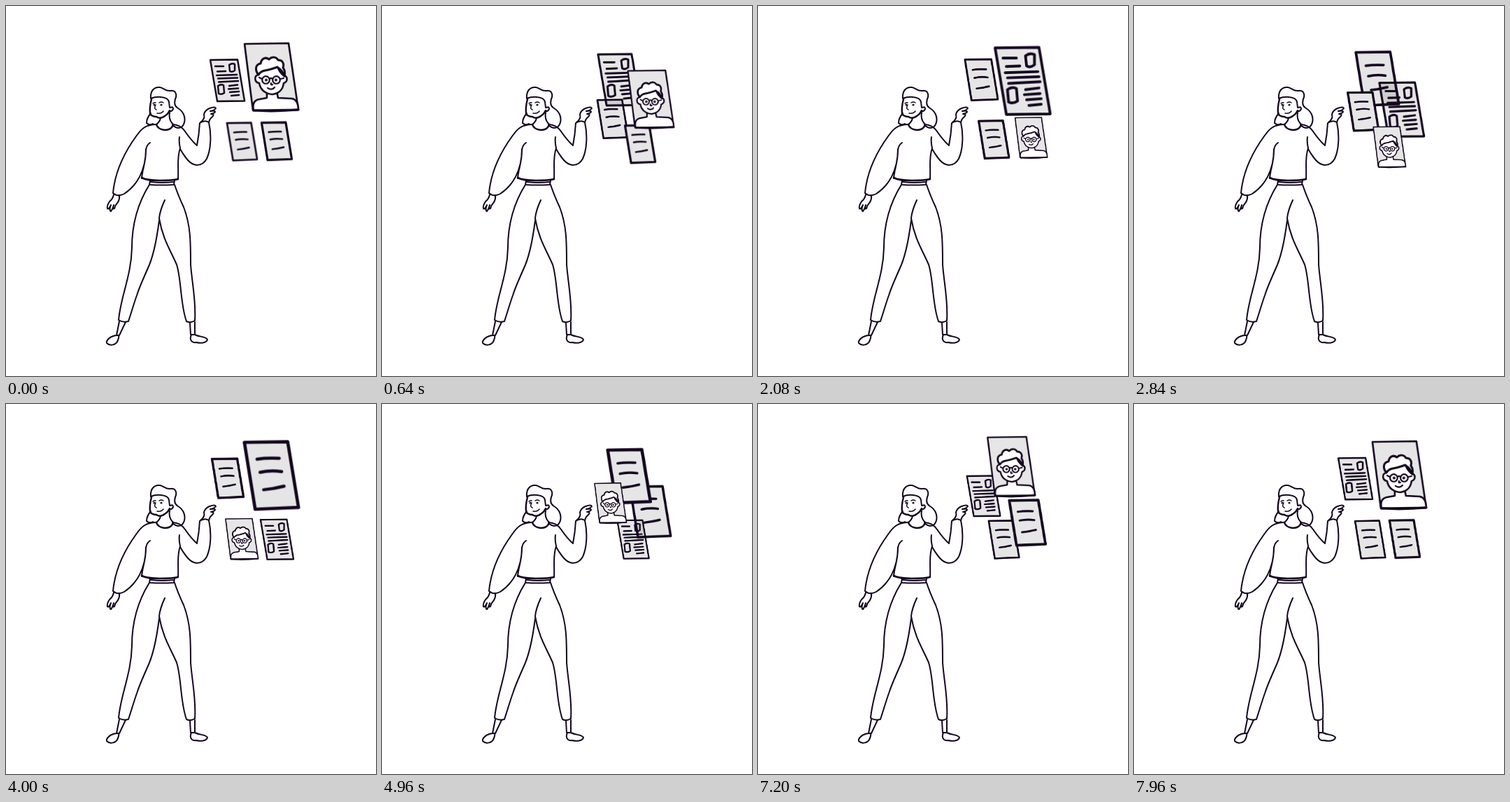
These frames come from a looping animation (529x528 px, 8 s). An HTML page:

```html
<!DOCTYPE html>
<html lang="en">
<head>
<meta charset="utf-8">
<title>Moving cards</title>
<style>
html, body { margin: 0; width: 100%; height: 100%; overflow: hidden; background: #fff; }
svg { display: block; width: 529px; height: 528px; }
svg { fill: none; stroke: #14061f; stroke-linecap: round; stroke-linejoin: round; }
.white { fill: #fff; }
.sheet { fill: #e6e6e6; }
.clear { fill: rgba(0, 0, 0, .1); }
.dark { fill: #14061f; }
.person { stroke-width: 2; }

.card { animation: 8s cubic-bezier(.33, .3, .67, .95) infinite; }
#resume { animation-name: resume; }
#first { animation-name: first; }
#second { animation-name: second, dip; }
#portrait { animation-name: portrait, swing; }
#second, #portrait { animation-timing-function: cubic-bezier(.33, .3, .67, .95), ease-in-out; }

/* Each card visits the four places clockwise, two seconds apart. */
@keyframes resume {
  0%, 100% { transform: translate(316.5px, 106px) scale(1.04); }
  25% { transform: translate(378px, 103px) scale(1.7); }
  50% { transform: translate(387.5px, 193px) scale(1); }
  75% { transform: translate(337.5px, 193px) scale(.93); }
}
@keyframes portrait {
  0%, 100% { transform: translate(380px, 102px) scale(1.72); }
  25% { transform: translate(393px, 188px) scale(1.03); }
  50% { transform: translate(337.5px, 193px) scale(1.04); }
  75% { transform: translate(319px, 103px) scale(1); }
}
@keyframes first {
  0%, 100% { transform: translate(337.5px, 193.5px) scale(.96); }
  25% { transform: translate(317px, 105.5px) scale(1.02); }
  50% { transform: translate(379.5px, 102px) scale(1.72); }
  75% { transform: translate(386.5px, 193px) scale(.98); }
}
@keyframes second {
  0%, 100% { transform: translate(387px, 193px) scale(.96); }
  25% { transform: translate(338px, 194px) scale(.96); }
  50% { transform: translate(317px, 106px) scale(1); }
  75% { transform: translate(380.5px, 101px) scale(1.63); }
}
@keyframes dip {
  0%, 25%, 75%, 100% { translate: 0 0; }
  14% { translate: 0 6px; }
  88% { translate: 0 3px; }
}
@keyframes swing {
  0%, 25%, 50%, 75%, 100% { translate: 0 0; }
  38% { translate: 0 12px; }
  82% { translate: 0 -21px; }
}
</style>
</head>
<body>
<svg viewBox="0 0 529 528">
  <defs>
    <path id="page" d="M-22.5-27.5 13.5-28 22.5 26.5-13.5 28Z"/>
    <path id="lines" stroke-width="2.6" d="M-12-13.6Q-4-14.8 6.5-14.3M-9.5-2.7Q-1-4.5 8.5-3.3M-6.5 11.8Q2 11 10.5 8.8"/>
  </defs>

  <g class="person">
    <!-- hair and head -->
    <path d="M207 132C206 121 212 115 220 116C226 117 228 122 235 121C242 120 244 125 243 130C240 137 241 143 246 146C253 150 257 158 255 166C253 174 246 177 238 170"/>
    <path d="M207 132Q214 129 222 130Q232 131 233 137L234 145"/>
    <path stroke-width="2.4" d="M208 133Q205 144 206 154Q209 158 215 158Q221 162 227 157Q232 154 234 149"/>
    <path d="M235 145Q239 143 239 147Q237 151 234 150M207 153Q201 160 201 167Q205 171 210 168M221 160Q220 165 215 169M234 152Q232 161 238 168"/>
    <path stroke-width="1.5" d="M210 139Q212 137 214 138M219 138Q222 136 225 138M214 141Q211 147 215 148M216 153Q222 154 225 150"/>
    <circle class="dark" cx="212" cy="141" r=".6"/>
    <circle class="dark" cx="222" cy="141" r=".6"/>
    <path stroke-width="2.6" d="M215 169Q217 176 227 177Q237 177 239 169"/>
    <!-- jumper -->
    <path d="M215 169C199 169 193 176 186 186C170 208 156 234 153 267Q160 273 169 268C186 257 200 236 200 204M206 195Q201 198 200 206C200 224 195 232 194 246"/>
    <path stroke-width="2.6" d="M194 245Q201 249 220 249T246 247"/>
    <path d="M246 247C247 230 244 217 249 203Q247 194 248 187M239 169Q250 170 256 179Q265 192 273 199Q276 184 277 167Q284 162 290 166C294 184 293 205 287 218C280 230 268 229 260 220Q254 213 249 204"/>
    <!-- hands -->
    <path d="M278 166Q285 161 283 155Q284 149 291 146Q299 143 300 146Q298 149 292 150Q299 149 299 151Q298 153 293 154Q299 154 295 158Q291 161 290 166"/>
    <path d="M154 269Q153 275 148 279Q144 285 145 289Q147 291 150 284Q147 292 150 293Q152 291 154 284Q152 291 155 289Q156 284 160 280Q163 275 162 270"/>
    <!-- trousers -->
    <path d="M206 249L205 255Q223 256 240 255L241 249M207 251Q223 253 240 251"/>
    <path d="M205 255C190 279 180 309 180 345C179 386 164 414 161 448Q167 452 175 450C180 435 183 424 187 413C191 400 197 388 202 376C208 364 214 345 219 306M227 277Q220 292 219 303C224 333 236 350 244 369C251 391 249 425 258 450Q264 453 270 449C272 421 266 396 264 369C264 336 264 313 254 287Q246 270 241 255"/>
    <!-- feet -->
    <path d="M162 450L158 470M171 451L162 470M158 470C149 471 143 477 144 481C149 486 157 483 159 479Q162 473 161 470Z"/>
    <path d="M263 452L264 469M270 451L270 468M265 469C262 476 265 481 272 480C280 482 287 480 288 476C285 471 278 473 270 469Z"/>
  </g>

  <g id="resume" class="card">
    <g transform="scale(.962) translate(-316.5 -106)" stroke-width="2.4">
      <path class="sheet" d="M292 77 331 76.5 341 135.5 302 136Z"/>
      <path d="M299 86H311M302 93.5 314 93M301 99 330 98M303 103.5 331 102.5M304 108.5 332 107M319 114 331 112.5M318 118.5 332 117.5M320 123 333 122M322 128 333 127"/>
      <path d="M319 84Q323 81 327 83L327 92Q323 95 320 93ZM303 114Q307 111 311 113L312 124Q308 127 304 125Z"/>
    </g>
  </g>

  <g id="first" class="card" stroke-width="2.7">
    <use class="clear" href="#page"/>
    <use href="#lines"/>
  </g>

  <g id="second" class="card" stroke-width="3.3">
    <use class="sheet" href="#page"/>
    <use href="#lines"/>
  </g>

  <g id="portrait" class="card">
    <g transform="scale(.581) translate(-380 -102)" stroke-width="2.6">
      <path class="sheet" d="M341 54 404 53 418 148 353 149Z"/>
      <path class="white" d="M354 149Q351 135 362 133L373 131 373 122H387L389 131 409 132Q418 134 418 148Z"/>
      <path stroke-width="3.4" d="M354 149Q385 151 418 148"/>
      <path class="white" d="M361 98C354 99 355 109 362 110C364 121 373 126 381 126C390 125 396 119 397 110C403 108 403 101 398 99L393 84 368 88Z"/>
      <path class="white" stroke-width="3" d="M361 98C355 91 357 83 364 82C365 75 371 72 376 76C381 71 387 73 389 77C396 77 398 83 396 88Q400 93 398 100L391 91 388 87Q377 91 370 92Q364 93 361 98Z"/>
      <path class="dark" d="M389 88Q395 91 398 100Q391 95 389 88Z"/>
      <g stroke-width="2.2">
        <circle cx="371.5" cy="105.5" r="5.3"/>
        <circle cx="386.5" cy="105.5" r="5.3"/>
        <path d="M377 104Q379 102 381 104M366 104 362 102M392 104 397 103M379 110Q378 113 381 112M374 117Q380 121 384 116"/>
      </g>
      <circle class="dark" cx="372" cy="105.5" r=".7"/>
      <circle class="dark" cx="386" cy="105.5" r=".7"/>
    </g>
  </g>
</svg>
</body>
</html>
```
